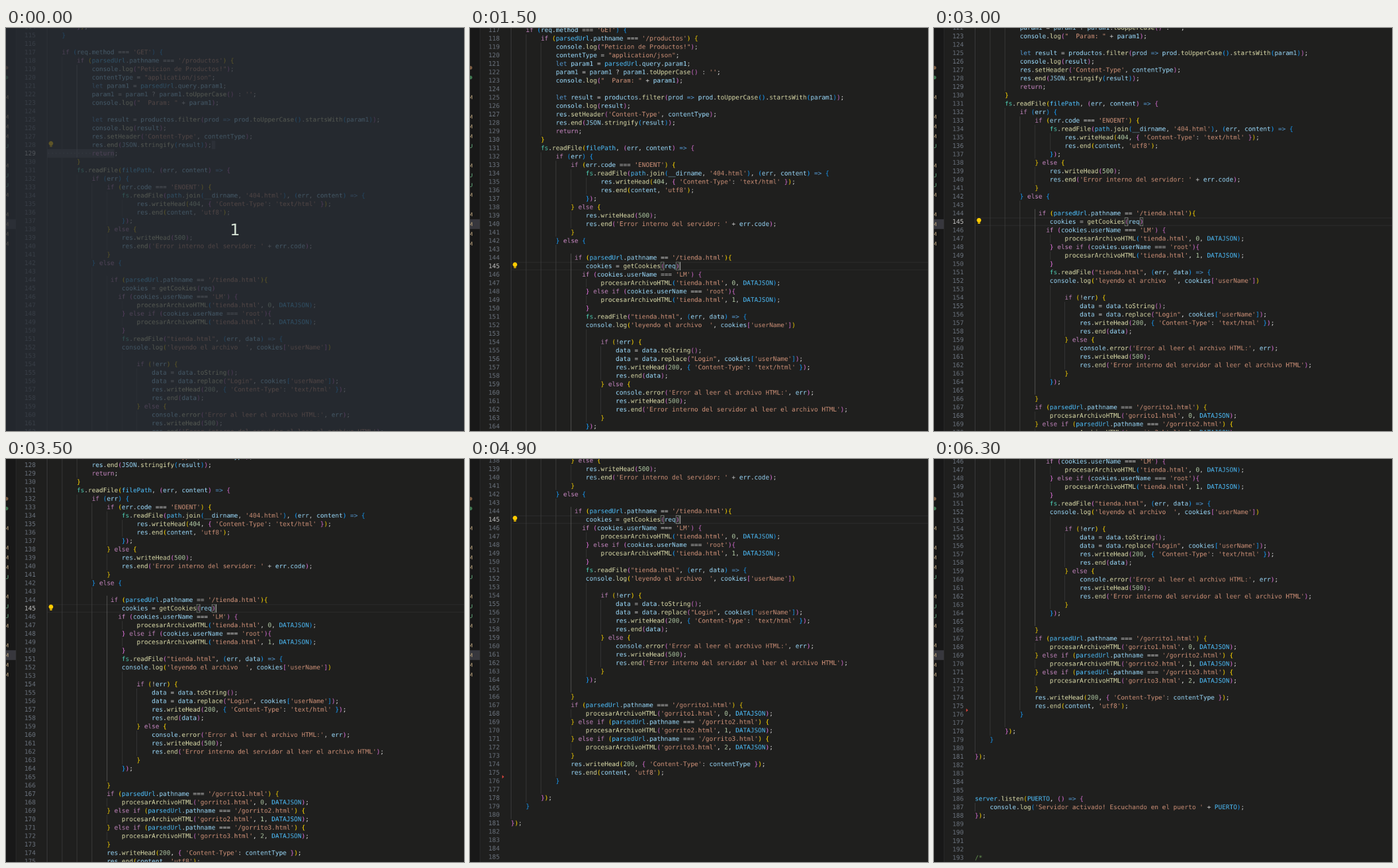
An HTML page with a canvas that plays this animation: 797x702 px, repeating every 7700 ms.

```html
<!DOCTYPE html>
<html lang="es">
<head>
<meta charset="utf-8">
<title>Editor</title>
<style>
html, body { margin: 0; width: 100%; height: 100%; overflow: hidden; background: #1f1f1f; }
canvas { display: block; width: 797px; height: 702px; }
</style>
</head>
<body>
<canvas id="stage" width="797" height="702"></canvas>
<script>
// The editor is painted at its natural size, then scaled down to the stage
const W = 1031, H = 908, LOOP = 7700;
const stage = document.getElementById('stage');
const view = stage.getContext('2d');
const page = document.createElement('canvas');
page.width = W;
page.height = H;
const ctx = page.getContext('2d');

const LINE = 19, CHAR = 8.43, LEFT = 92, NUM_X = 41.6, BASE = 14;
const FIRST = 114, CARET_LINE = 145, CARET_TOP = 577, NOTCH = 50;
const MONO = '14px "DejaVu Sans Mono", monospace';

const SCROLLS = [1200, 1900, 2600, 3100, 3200, 3800, 4400, 4500, 4900, 5100, 5800, 6300];

const COLOR = {
  control: '#c586c0', storage: '#569cd6', name: '#9cdcfe', constant: '#4fc1ff',
  module: '#4ec9b0', call: '#dcdcaa', string: '#ce9178', number: '#b5cea8',
  comment: '#6a9955', plain: '#d4d4d4'
};
const BRACKETS = ['#ffd700', '#da70d6', '#179fff'];

const CODE = `        });
    }

    if (req.method === 'GET') {
        if (parsedUrl.pathname === '/productos') {
            console.log("Peticion de Productos!");
            contentType = "application/json";
            let param1 = parsedUrl.query.param1;
            param1 = param1 ? param1.toUpperCase() : '';
            console.log("  Param: " + param1);

            let result = productos.filter(prod => prod.toUpperCase().startsWith(param1));
            console.log(result);
            res.setHeader('Content-Type', contentType);
            res.end(JSON.stringify(result));
            return;
        }
        fs.readFile(filePath, (err, content) => {
            if (err) {
                if (err.code === 'ENOENT') {
                    fs.readFile(path.join(__dirname, '404.html'), (err, content) => {
                        res.writeHead(404, { 'Content-Type': 'text/html' });
                        res.end(content, 'utf8');
                    });
                } else {
                    res.writeHead(500);
                    res.end('Error interno del servidor: ' + err.code);
                }
            } else {

                 if (parsedUrl.pathname == '/tienda.html'){
                    cookies = getCookies(req)
                   if (cookies.userName === 'LM') {
                        procesarArchivoHTML('tienda.html', 0, DATAJSON);
                    } else if (cookies.userName === 'root'){
                        procesarArchivoHTML('tienda.html', 1, DATAJSON);
                    }
                    fs.readFile("tienda.html", (err, data) => {
                    console.log('leyendo el archivo  ', cookies['userName'])

                        if (!err) {
                            data = data.toString();
                            data = data.replace("Login", cookies['userName']);
                            res.writeHead(200, { 'Content-Type': 'text/html' });
                            res.end(data);
                        } else {
                            console.error('Error al leer el archivo HTML:', err);
                            res.writeHead(500);
                            res.end('Error interno del servidor al leer el archivo HTML');
                        }
                    });

                }
                if (parsedUrl.pathname === '/gorrito1.html') {
                    procesarArchivoHTML('gorrito1.html', 0, DATAJSON);
                } else if (parsedUrl.pathname === '/gorrito2.html') {
                    procesarArchivoHTML('gorrito2.html', 1, DATAJSON);
                } else if (parsedUrl.pathname === '/gorrito3.html') {
                    procesarArchivoHTML('gorrito3.html', 2, DATAJSON);
                }
                res.writeHead(200, { 'Content-Type': contentType });
                res.end(content, 'utf8');
            }

        });
    }

});




server.listen(PUERTO, () => {
    console.log('Servidor activado! Escuchando en el puerto ' + PUERTO);
});




/*`.split('\n');

function wordColor(word, next) {
  if (/^(if|else|return)$/.test(word)) return COLOR.control;
  if (word === 'let') return COLOR.storage;
  if (word === 'fs') return COLOR.module;
  if (next === '(') return COLOR.call;
  if (/^(parsedUrl|filePath|path|DATAJSON|PUERTO|server)$/.test(word)) return COLOR.constant;
  return COLOR.name;
}

// Splits the code into coloured tokens; bracket colours cycle with nesting depth
function tokenize(lines) {
  const part = /'[^']*'|"[^"]*"|\/\*|=>|[A-Za-z_]\w*|\d+|[()[\]{}]|[^\s\w'"()[\]{}]+/g;
  let depth = 5;
  return lines.map(line => [...line.matchAll(part)].map(m => {
    const text = m[0], col = m.index;
    let color = COLOR.plain;
    if (/^['"]/.test(text)) color = COLOR.string;
    else if (text === '/*') color = COLOR.comment;
    else if (text === '=>') color = COLOR.storage;
    else if (/^\d/.test(text)) color = COLOR.number;
    else if (/^\w/.test(text)) color = wordColor(text, line[col + text.length]);
    else if (/[([{]/.test(text)) color = BRACKETS[depth++ % 3];
    else if (/[)\]}]/.test(text)) color = BRACKETS[--depth % 3];
    return { text, col, color };
  }));
}

// Number of indent guides on each line; blank lines follow their neighbours
function countGuides(lines) {
  const indent = lines.map(l => l.trim() ? l.search(/\S/) : -1);
  return indent.map((n, i) => {
    if (n >= 0) return Math.ceil(n / 4);
    let a = i, b = i;
    while (indent[a] < 0) a--;
    while (indent[b] < 0) b++;
    const up = indent[a], down = indent[b];
    return up === down ? Math.ceil(down / 4) : 1 + Math.floor(Math.min(up, down) / 4);
  });
}

const TOKENS = tokenize(CODE);
const GUIDES = countGuides(CODE);
const colX = col => LEFT + col * CHAR;

function rect(x, y, w, h, color) {
  ctx.fillStyle = color;
  ctx.fillRect(x, y, w, h);
}

function dot(x, y, r, color) {
  ctx.fillStyle = color;
  ctx.beginPath();
  ctx.arc(x, y, r, 0, 7);
  ctx.fill();
}

function text(str, x, y, color) {
  ctx.fillStyle = color;
  ctx.fillText(str, x, y);
}

function drawSidebar() {
  rect(0, 0, 22, H, '#181818');
  rect(22, 0, 1, H, '#2b2b2b');
  const pitch = 22, mid = 442;
  rect(0, mid - 11, 22, pitch, '#37373d');
  ctx.font = '11.7px "DejaVu Sans", sans-serif';
  ctx.textAlign = 'right';
  [...'oO.M.MMMU.MUUM.MMMM'].forEach((mark, i) => {
    const y = mid + (i - 16) * pitch;
    if (mark === 'o') dot(1, y - 0.5, 4, '#7c5c42');
    else if (mark === 'O') dot(1, y - 0.5, 4, '#3f7650');
    else if (mark === 'M') text('M', 6, y + 4, '#b9a27c');
    else if (mark === 'U') text('U', 6, y + 4, '#62a97b');
  });
  ctx.textAlign = 'left';
}

function drawBulb(top) {
  const x = 101.2;
  dot(x, top + 6, 5, '#ffcc00');
  rect(x - 2.5, top + 9, 5, 5, '#ffcc00');
  rect(x - 1.5, top + 11, 3, 1, '#4a3f10');
}

function drawGuides(top, i, line, active) {
  for (let g = 0; g < GUIDES[i]; g++) {
    const lit = g === active.level && line >= active.from && line <= active.to;
    rect(Math.round(colX(g * 4)), top, 1, LINE, lit ? '#707070' : '#404040');
  }
}

function drawSelection(topOf) {
  const fill = '#3a3d41';
  rect(colX(44), topOf(128), CHAR, LINE, fill);
  rect(LEFT, topOf(129), 18 * CHAR, LINE, fill);
  for (let c = 0; c < 12; c++) {
    text('·', colX(c), topOf(129) + BASE, 'rgba(227,228,226,0.22)');
  }
}

function drawCaretLine(top) {
  rect(LEFT, top, W - LEFT, 2, '#282828');
  rect(LEFT, top + LINE - 2, W - LEFT, 2, '#282828');
}

function drawBracketMatch(top) {
  ctx.strokeStyle = '#888';
  ctx.lineWidth = 1;
  for (const col of [40, 44]) {
    const x = Math.round(colX(col));
    rect(x, top, 8, LINE, 'rgba(0,100,0,0.1)');
    ctx.strokeRect(x + 0.5, top + 0.5, 7, LINE - 1);
  }
}

function drawDeletedMark(y) {
  ctx.fillStyle = '#e0463f';
  ctx.beginPath();
  ctx.moveTo(72.5, y - 4);
  ctx.lineTo(76.5, y);
  ctx.lineTo(72.5, y + 4);
  ctx.fill();
}

function drawCountdown() {
  rect(0, 0, W, H, 'rgba(39,44,52,0.75)');
  ctx.font = '36px "DejaVu Sans", sans-serif';
  ctx.textAlign = 'center';
  text('1', W / 2, 467, '#d9e6d8');
  ctx.textAlign = 'left';
}

function draw(t) {
  const notches = SCROLLS.filter(s => t >= s).length;
  const topOf = line => CARET_TOP - notches * NOTCH + (line - CARET_LINE) * LINE;
  const clicked = t >= 500;
  const current = clicked ? CARET_LINE : 129;
  const active = clicked ? { level: 4, from: 144, to: 165 } : { level: 2, from: 119, to: 129 };

  rect(0, 0, W, H, '#1f1f1e');
  drawSidebar();

  ctx.font = MONO;
  if (clicked) drawCaretLine(topOf(CARET_LINE));
  else drawSelection(topOf);
  if (t >= 600) drawBracketMatch(topOf(CARET_LINE));

  TOKENS.forEach((tokens, i) => {
    const line = FIRST + i, top = topOf(line);
    if (top < -LINE || top > H) return;
    drawGuides(top, i, line, active);
    text(line, NUM_X, top + BASE, line === current ? '#cccccc' : '#6e7681');
    for (const k of tokens) text(k.text, colX(k.col), top + BASE, k.color);
  });

  drawBulb(topOf(t < 800 ? 128 : CARET_LINE));
  drawDeletedMark(topOf(176));
  if (clicked && Math.floor(t / 500) % 2 === 1) {
    rect(472, topOf(CARET_LINE), 1.5, LINE, '#c4c5c3');
  }
  if (t < 100) drawCountdown();

  view.drawImage(page, 0, 0, stage.width, stage.height);
}

ctx.textRendering = 'geometricPrecision';
ctx.fontKerning = 'none';
view.imageSmoothingQuality = 'low';
const start = performance.now();

function tick() {
  draw((performance.now() - start) % LOOP);
  requestAnimationFrame(tick);
}
tick();
</script>
</body>
</html>
```
